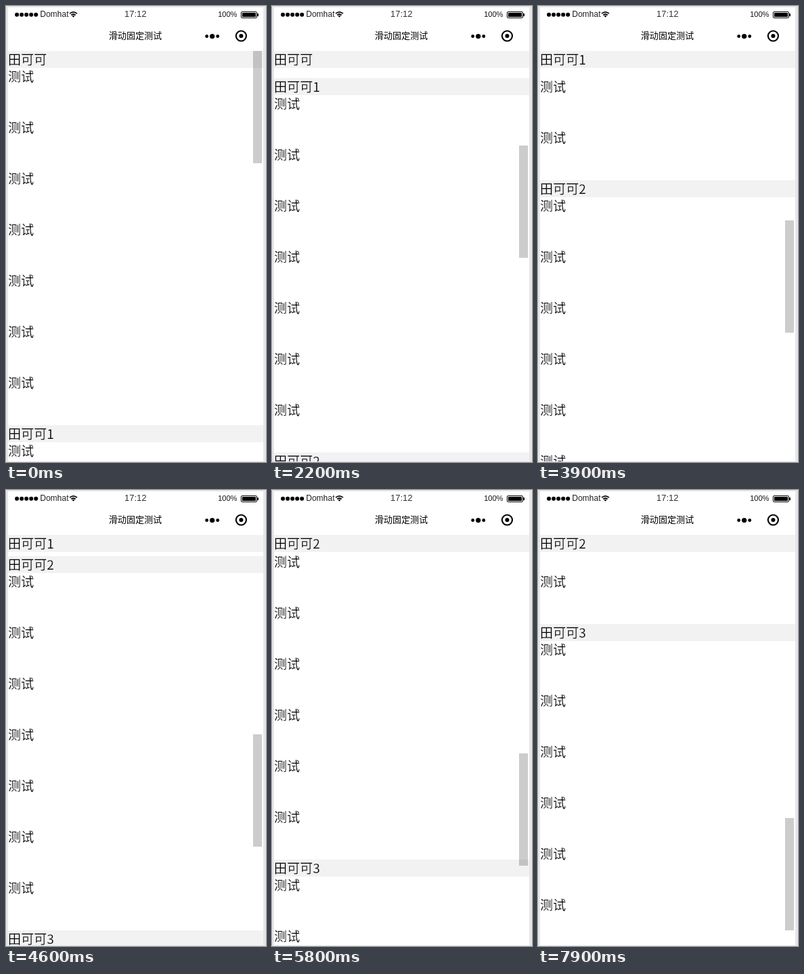
These frames come from a looping animation (382x670 px, 8000 ms). An HTML page:

```html
<!DOCTYPE html>
<html lang="zh-CN">
<head>
<meta charset="utf-8">
<title>滑动固定测试</title>
<style>
  html, body { margin: 0; width: 100%; height: 100%; overflow: hidden; background: #e6e6e6; }
  .phone { position: absolute; left: 3px; top: 2px; width: 375px; height: 667px; background: #fff; overflow: hidden; }
  .bar { position: absolute; left: -3px; top: -2px; }
  .bar text { font-family: "Liberation Sans", Arial, sans-serif; }
  .bar .title { font: 13px "Noto Sans CJK SC", "Noto Sans CJK", sans-serif; }
  .view { position: absolute; top: 64px; width: 375px; height: 603px; overflow: hidden;
    font: 300 19px/24px "Noto Sans CJK SC", "Noto Sans CJK", sans-serif; color: #000; }
  /* A background-coloured outline slims the strokes. */
  .item { height: 75px; -webkit-text-stroke: .25px #fff; }
  .head { position: sticky; top: 0; height: 25px; background: #f2f2f2; -webkit-text-stroke: .25px #f2f2f2; }
  .thumb { position: absolute; left: 360px; top: 64px; width: 13px; height: 165px; background: rgba(0, 0, 0, .2); }
</style>
</head>
<body>
<div class="phone">
  <svg class="bar" width="382" height="66">
    <g id="signal"></g>
    <text x="50" y="16" font-size="12" fill="#222">Domhat</text>
    <path d="M93.6 11.2Q99 6.6 104.4 11.2M95.7 13.4Q99 10.6 102.3 13.4" fill="none" stroke="#000" stroke-width="1.7"/>
    <path d="M97 14.6Q99 13 101 14.6L99 16.8Z"/>
    <text x="190.3" y="16" font-size="13" text-anchor="middle" fill="#333">17:12</text>
    <text x="311.5" y="16" font-size="11" fill="#111">100%</text>
    <rect x="345.5" y="8.5" width="23" height="9" rx="1.5" fill="none" stroke="#000"/>
    <rect x="347" y="10" width="20" height="6" rx=".5"/>
    <rect x="369" y="11" width="2" height="4" rx=".5"/>
    <text class="title" x="190" y="48" text-anchor="middle">滑动固定测试</text>
    <circle cx="295" cy="44.5" r="2.4"/>
    <circle cx="303" cy="44.5" r="3.6"/>
    <circle cx="311" cy="44.5" r="2.4"/>
    <circle cx="345.5" cy="44" r="7.5" fill="none" stroke="#000" stroke-width="2.1"/>
    <circle cx="345.5" cy="44" r="3"/>
  </svg>
  <div class="view"></div>
  <div class="thumb"></div>
</div>
<script>
  const LOOP = 8000, STEP = 100;
  const view = document.querySelector('.view');
  const thumb = document.querySelector('.thumb');

  document.getElementById('signal').innerHTML = Array.from({ length: 5 },
    (_, i) => `<circle cx="${16 + 7 * i}" cy="12.7" r="3"/>`).join('');

  view.innerHTML = ['', 1, 2, 3].map(n =>
    `<section><div class="head">田可可${n}</div>${'<div class="item">测试</div>'.repeat(7)}</section>`
  ).join('');

  // Each swipe jumps to an offset, then glides to rest.
  const swipes = [
    { start: 0, end: 0, from: 0, to: 0 },
    { start: 500, end: 700, from: 24, to: 48 },
    { start: 1100, end: 1400, from: 138, to: 302 },
    { start: 1700, end: 2200, from: 340, to: 510 },
    { start: 2500, end: 3100, from: 520, to: 665 },
    { start: 3400, end: 4100, from: 708, to: 928 },
    { start: 4300, end: 5100, from: 1005, to: 1110 },
    { start: 5200, end: 5500, from: 1122, to: 1148 },
    { start: 5800, end: 6600, from: 1173, to: 1597 },
    { start: 7900, end: 7900, from: 1519, to: 1519 },
  ];

  function offsetAt(time) {
    const tick = Math.floor(time / STEP) * STEP;
    const { start, end, from, to } = swipes.findLast(swipe => swipe.start <= tick);
    const left = tick < end ? (end - tick) / (end - start) : 0;
    return Math.round(to - (to - from) * left ** 2);
  }

  const maxScroll = view.scrollHeight - view.clientHeight;
  const travel = view.clientHeight - thumb.clientHeight;

  function draw() {
    const offset = offsetAt(performance.now() % LOOP);
    view.scrollTop = offset;
    thumb.style.transform = `translateY(${Math.floor(offset / maxScroll * travel)}px)`;
    requestAnimationFrame(draw);
  }
  draw();
</script>
</body>
</html>
```
